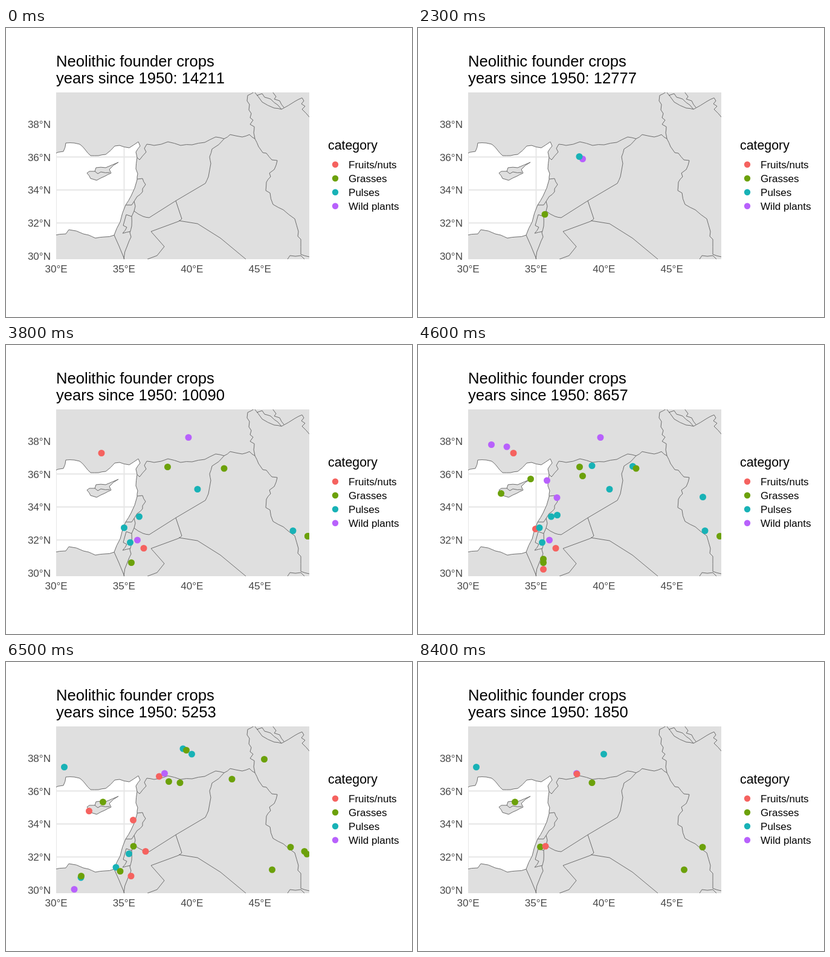
Animation of 672x480 px, one loop 10000 ms. Source, as an HTML page:

```html
<!DOCTYPE html>
<html lang="en">
<head>
<meta charset="utf-8">
<title>Neolithic founder crops</title>
<style>
  html, body { margin: 0; width: 100%; height: 100%; overflow: hidden; background: #fff; }
  svg { display: block; width: 672px; height: 480px; }
  text { font-family: "Liberation Sans", Arial, sans-serif; font-kerning: none; }
  .title { font-size: 25.6px; }
  .axis { font-size: 17.07px; fill: #474747; }
  .head { font-size: 21.33px; }
  .label { font-size: 17.07px; }
  .line { fill: none; stroke: #6c6c6c; stroke-width: 1; stroke-linejoin: round; }
  .grid { stroke: #e6e6e6; stroke-width: 2; }
</style>
</head>
<body>
<svg id="stage" viewBox="0 0 672 480"></svg>
<script>
const NS = "http://www.w3.org/2000/svg";
const stage = document.getElementById("stage");
const PANEL = { x: 83, y: 107, width: 419, height: 277 };
const LAND = "#dfdfdf";

function add(parent, tag, attrs, text) {
  const el = document.createElementNS(NS, tag);
  for (const key in attrs) el.setAttribute(key, attrs[key]);
  if (text) el.textContent = text;
  return parent.appendChild(el);
}

let seed = 7;
const random = () => (seed = seed * 16807 % 2147483647) / 2147483647;
const parse = list => list.split(" ").map(pair => pair.split(",").map(Number));

// Path through key points; long legs get midpoints pushed sideways.
function trace(list, wiggle = 0.14) {
  const out = [];
  parse(list).forEach(([x, y], i, all) => {
    if (i && wiggle) {
      const [px, py] = all[i - 1], dx = x - px, dy = y - py;
      if (Math.hypot(dx, dy) > 10) {
        const push = (random() - 0.5) * wiggle;
        out.push([(px + x) / 2 - dy * push, (py + y) / 2 + dx * push]);
      }
    }
    out.push([x, y]);
  });
  return "M" + out.map(p => p.map(v => v.toFixed(1))).join(" ");
}

const sea = trace("78,210 95,205 99,191 113,191 122,193 131,202 140,212 153,212 165,210 " +
  "180,196 188,195 204,199 219,189 222,196 215,206 217,215 215,234 218,242 217,252 " +
  "207,279 198,294 189,322 179,344 163,347 148,349 137,344 128,342 104,335 99,342 78,345");
const cyprus = trace("134,241 138,238 147,238 149,232 165,232 186,223 171,235 174,241 " +
  "164,246 150,253 140,250 134,241");

const frontiers = [
  "147,238 152,242 157,239 172,240",
  // Turkey with Syria and Iraq
  "217,215 221,219 232,206 229,200 233,193 245,195 268,189 289,195 308,194 329,190 347,181 " +
    "361,184 371,177 391,181 403,177 412,184",
  "361,184 341,201 337,214 339,225 335,247 330,258",
  // Lebanon, Israel, Jordan
  "237,315 227,313 219,309 212,304 214,296 212,288 217,280 226,272 226,267 231,260 226,250 217,251",
  "212,288 208,294 198,294",
  "212,304 208,313 208,329 205,340 207,347 201,361 195,384",
  "208,313 199,310 194,328 200,331 193,341 206,338",
  // Iran with Turkey and Iraq
  "411,106 400,112 399,121 403,127 402,136 406,142 404,149 409,153 404,160 411,164 410,174 " +
    "412,184 418,197 425,207 431,208 440,219 449,220 444,235 436,241 438,247 431,256 " +
    "430,270 437,274 442,293 459,302 478,317 484,338 483,346 488,351 488,376 502,380",
  "466,384 470,378 488,378 494,384",
  // Caucasus
  "411,106 424,123 444,133 456,135 478,122 490,116 493,121 489,126 495,130 490,135 503,149",
  "415,112 424,109 428,115 438,118 450,128 456,135",
  "441,106 447,114 444,118 453,121 460,132"
];
const straight = [
  "330,258 281,287 237,315",
  "281,287 291,317 286,321 240,338 262,363 250,378 234,384",
  "286,320 317,325 355,349 397,384",
  "179,344 187,362 196,384"
];
const lines = [
  sea, cyprus,
  ...frontiers.map(list => trace(list)),
  ...straight.map(list => trace(list, 0))
];

const categories = {
  red: ["Fruits/nuts", "#f5625f"],
  green: ["Grasses", "#6ca10a"],
  teal: ["Pulses", "#18b2b6"],
  purple: ["Wild plants", "#b861fc"]
};

// Finds come in waves: each dot starts and ends up to six steps after its wave.
const waves = [
  { from: 1, to: 8, green: "210,309.5" },
  { from: 8, to: 17,
    purple: "272.5,217.5 471.5,252.5",
    green: "330.5,164.5 200,298.5 499.5,317.5",
    teal: "267,213.5 363,203.5 372.5,194.5 195.5,303.5 211,315",
    red: "205.5,328" },
  { from: 21, to: 33,
    red: "158,179.5 194.5,305.5 228,337.5 207.5,372.5",
    teal: "288,200.5 317,239.5 355.5,201.5 220.5,285 230.5,282.5 471.5,252.5 475,308.5 201,303.5 205.5,328",
    green: "267.5,202.5 272.5,217.5 361,205 186.5,222.5 137.5,246.5 207.5,361.5 207.5,355.5 499.5,317.5",
    purple: "121.5,165.5 147,169 302,153.5 213.5,225 230,253.5 217.5,324" },
  { from: 35, to: 43, green: "272.5,217.5 198,307" },
  { from: 35, to: 56,
    red: "253.5,190 137.5,247.5 210.5,262.5 207,355.5",
    teal: "293,144 203.5,318.5 182,341 124,358",
    green: "298.5,146.5 427.5,161.5 269.5,198.5 374,194.5 211,306 189,347.5 124.5,355.5 494,314.5 498,319",
    purple: "113,377.5" },
  { from: 35, to: 69,
    teal: "96.5,174.5 307.5,153",
    green: "288,200.5 160.5,232.5 440.5,345" },
  { from: 43, to: 56, red: "231,314.5" },
  { from: 43, to: 69, purple: "262.5,185", green: "471,307.5" },
  { from: 60, to: 69, green: "202.5,307", red: "263,186 211,306" }
];

const defs = add(stage, "defs", {});
add(add(defs, "clipPath", { id: "panel" }), "rect", PANEL);
add(add(defs, "clipPath", { id: "water" }), "path", { d: sea });

const map = add(stage, "g", { "clip-path": "url(#panel)" });
add(map, "rect", { ...PANEL, fill: LAND });
add(map, "path", { d: sea, fill: "#fff" });
add(map, "path", { class: "grid", "clip-path": "url(#water)",
  d: "M83 107V384M195.5 107V384M83 214.3H502M83 269H502M83 323.7H502" });
add(map, "path", { d: cyprus, fill: LAND });
for (const d of lines) add(map, "path", { class: "line", d });

add(stage, "text", { class: "title", x: 83, y: 64 }, "Neolithic founder crops");
const counter = add(stage, "text", { class: "title", x: 83, y: 92 });

for (let i = 0; i < 5; i++)
  add(stage, "text", { class: "axis", x: 74, y: Math.round(166 + 54.7 * i), "text-anchor": "end" },
    38 - 2 * i + "°N");
for (let i = 0; i < 4; i++)
  add(stage, "text", { class: "axis", x: 83 + 112.4 * i, y: 406, "text-anchor": "middle" },
    30 + 5 * i + "°E");

add(stage, "text", { class: "head", x: 533, y: 202 }, "category");
Object.values(categories).forEach(([name, fill], i) => {
  const y = 226.7 + 23 * i;
  add(stage, "circle", { cx: 545, cy: y, r: 5.2, fill });
  add(stage, "text", { class: "label", x: 567, y: y + 6.2 }, name);
});

const spread = n => Math.floor(n * 0.618 % 1 * 7);
const dots = waves.flatMap(({ from, to, ...groups }) =>
  Object.entries(groups)
    .flatMap(([key, list]) => parse(list).map(at => [...at, categories[key][1]]))
    .map(([cx, cy, fill], i) => ({
      el: add(map, "circle", { cx, cy, r: 5.5, fill }),
      from: from + spread(i),
      to: to + spread(i * 2)
    })));

const LOOP = 10000, HOLD = 1600, STEP = 100, LAST = 69;
const FIRST_YEAR = 14211, LAST_YEAR = 1850;
let shown = -1;

function draw(time) {
  const t = time % LOOP;
  const step = t < HOLD ? 0 : Math.min(LAST, 1 + Math.floor((t - HOLD) / STEP));
  if (step === shown) return;
  shown = step;
  const year = FIRST_YEAR - (FIRST_YEAR - LAST_YEAR) * step / LAST;
  counter.textContent = "years since 1950: " + Math.floor(year + 1e-6);
  for (const { el, from, to } of dots)
    el.setAttribute("visibility", step >= from && step <= to ? "visible" : "hidden");
}

const start = performance.now();
function tick() {
  draw(performance.now() - start);
  requestAnimationFrame(tick);
}
tick();
</script>
</body>
</html>
```
